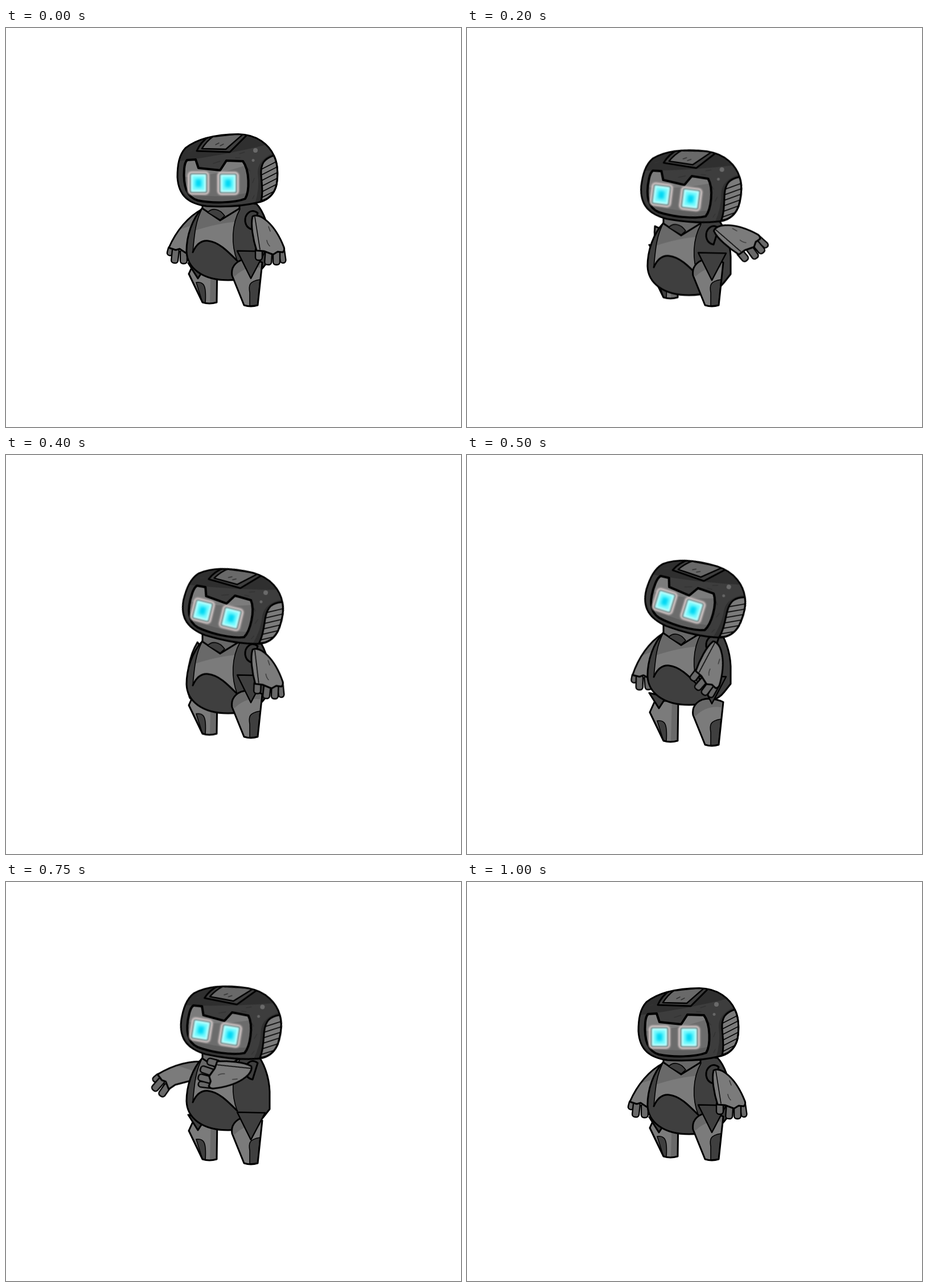
An HTML page that plays this animation: 799 by 701 pixels, repeating every 1.05 s.

```html
<!DOCTYPE html>
<html lang="en">
<head>
<meta charset="utf-8">
<title>Walking robot</title>
<style>
html, body { margin: 0; width: 100%; height: 100%; overflow: hidden; background: #fff; }
svg { display: block; width: 799px; height: 701px; }
g { stroke-linejoin: round; stroke-linecap: round; }
.ink { stroke: #000; stroke-width: 3; }
.mid { stroke: #000; stroke-width: 2.4; }
.thin { stroke: #000; stroke-width: 1.6; }
.light { fill: #7b7b7b; }
.dark { fill: #3f3f3f; }
.shade { fill: #696969; }
.none { fill: none; }
.scratch { fill: none; stroke: #333; stroke-width: 1.4; }

/* Four keyed quarters of five 50 ms steps, then one held step */
.move {
  transform-box: view-box;
  animation: 1050ms steps(5, end) -2ms infinite;
}
.bob { animation-name: bob; }
.head { animation-name: head; transform-origin: 364px 272.7px; }
.arm-l { animation-name: arm-l; transform-origin: 341px 334px; }
.arm-r { animation-name: arm-r; transform-origin: 432px 330px; }
.leg-l { animation-name: leg-l; }
.leg-r { animation-name: leg-r; }
.flap-l { animation-name: flap-l; }
.flap-r { animation-name: flap-r; }

@keyframes bob {
  0%, 95.2381%, 100% { transform: translateY(0); }
  23.8095% { transform: translateY(33px); }
  47.619% { transform: translateY(-4px); }
  71.4286% { transform: translateY(-7px); }
}
@keyframes head {
  0%, 95.2381%, 100% { transform: translate(0, 0) rotate(0deg); }
  23.8095% { transform: translate(3.75px, 30px) rotate(9deg); }
  47.619% { transform: translate(8px, -7.7px) rotate(17.2deg); }
  71.4286% { transform: translate(4px, -8.2px) rotate(9.3deg); }
}
@keyframes arm-l {
  0%, 95.2381%, 100% { transform: rotate(0deg); }
  23.8095% { transform: rotate(-70deg); }
  47.619% { transform: rotate(-5deg); }
  71.4286% { transform: rotate(35deg); }
}
@keyframes arm-r {
  0%, 95.2381%, 100% { transform: rotate(0deg); }
  23.8095% { transform: rotate(-50deg); }
  47.619% { transform: rotate(37deg); }
  71.4286% { transform: rotate(105deg); }
}
@keyframes leg-l {
  0%, 95.2381%, 100% { transform: translateY(0); }
  23.8095% { transform: translateY(-11px); }
  47.619% { transform: translateY(20px); }
  71.4286% { transform: translateY(5px); }
}
@keyframes leg-r {
  0%, 95.2381%, 100% { transform: translateY(0); }
  23.8095% { transform: translateY(0); animation-timing-function: steps(3, end); }
  38.0952% { transform: translateY(8px); animation-timing-function: steps(2, end); }
  47.619% { transform: translateY(22px); }
  71.4286% { transform: translateY(7px); }
}
@keyframes flap-l {
  0%, 95.2381%, 100% { transform: translateY(0); }
  23.8095% { transform: translateY(-40px); }
  47.619% { transform: translateY(5px); }
  71.4286% { transform: translateY(-4px); }
}
@keyframes flap-r {
  0%, 95.2381%, 100% { transform: translateY(0); }
  23.8095% { transform: translateY(4px); animation-timing-function: steps(3, end); }
  38.0952% { transform: translateY(-5px); animation-timing-function: steps(2, end); }
  47.619% { transform: translateY(-3px); }
  71.4286% { transform: translateY(13px); }
}
</style>
</head>
<body>
<svg viewBox="0 0 799 701">
  <defs>
    <filter id="soft" x="-50%" y="-50%" width="200%" height="200%"><feGaussianBlur stdDeviation="1.8"/></filter>
    <filter id="edge" x="-50%" y="-50%" width="200%" height="200%"><feGaussianBlur stdDeviation="1"/></filter>
    <filter id="core" x="-100%" y="-100%" width="300%" height="300%"><feGaussianBlur stdDeviation="2.4"/></filter>
    <path id="skull" d="M301 262C301 240 304 223 315 211C336 194 370 187 408 186.500C441 187 462 205 471 225C478 241 478 262 475 276C470 295 458 304 440 307C420 312 390 315 352 313C322 309 303 296 301 262Z"/>
    <path id="mask" d="M313 247Q314 236 318 232L333 231L338 246L376 250L387 233L416 234C428 250 428 287 420 300C400 308 360 308 337 303C315 297 311 272 313 247Z"/>
    <path id="vent" d="M470 224C453 230 447 238 448 258C450 280 451 292 448 304C467 299 475 284 476 268C478 245 475 232 470 224Z"/>
    <path id="chest" d="M345 316C333 338 331 360 328 394C335 378 345 373 355 374C374 376 390 393 406 409C395 380 396 345 411 318Z"/>
    <path id="sleeve" d="M345 318C320 331 299 356 286 386L298 390L305 388L317 396L322 383L350 350Z"/>
    <clipPath id="in-skull"><use href="#skull"/></clipPath>
    <clipPath id="in-mask"><use href="#mask"/></clipPath>
    <clipPath id="in-vent"><use href="#vent"/></clipPath>
    <clipPath id="in-chest"><use href="#chest"/></clipPath>
    <clipPath id="in-sleeve"><use href="#sleeve"/></clipPath>
    <g id="eye">
      <rect x="-17" y="-18.500" width="34" height="37" rx="5" class="none" stroke="#d8cccc" stroke-width="4" filter="url(#soft)"/>
      <rect x="-15" y="-17" width="30" height="34" rx="3" fill="#6f8383" filter="url(#edge)"/>
      <rect x="-13.500" y="-15.500" width="27" height="31" rx="2" fill="#b4fdfd" filter="url(#edge)"/>
      <rect x="-10" y="-12" width="20" height="24" rx="2" fill="#7dfbfd" filter="url(#edge)"/>
      <rect x="-5.500" y="-7" width="11" height="14" fill="#00d8f4" filter="url(#core)"/>
    </g>
  </defs>

  <g class="move bob"><g class="move arm-l">
    <g class="shade mid">
      <rect x="284" y="383" width="10" height="17" rx="5" transform="rotate(15 289 391)"/>
      <rect x="291" y="386" width="12" height="27" rx="5" transform="rotate(6 297 400)"/>
      <rect x="306" y="389" width="12" height="25" rx="5"/>
    </g>
    <use href="#sleeve" class="light"/>
    <path class="shade" clip-path="url(#in-sleeve)" d="M345 310L300 355L350 340Z"/>
    <use href="#sleeve" class="none ink"/>
  </g></g>

  <g class="move leg-l">
    <path class="light" d="M321 432L330 412L371 412L370 482Q357 486 345 482Z"/>
    <path class="shade" d="M360 412H371L370 483H358Z"/>
    <path class="dark thin" d="M334 447C348 445 352 453 350 483L345 482Z"/>
    <path class="none ink" d="M321 432L330 412L371 412L370 482Q357 486 345 482Z"/>
  </g>
  <g class="move flap-l">
    <path class="dark ink" d="M320 413L350 420L337 440Z"/>
  </g>

  <g class="move bob">
    <path class="dark ink" d="M345 316C327 335 317 365 317 392C318 422 345 443 390 443C415 443 440 436 452 420L463 406V375C462 348 452 322 440 309L410 306H352Z"/>
    <use href="#chest" class="light"/>
    <path class="shade" clip-path="url(#in-chest)" d="M320 310H412V340Q370 342 320 360Z"/>
    <use href="#chest" class="none thin"/>
    <path class="none ink" d="M328 394C335 378 345 373 355 374C374 376 390 393 406 409"/>
    <path class="shade ink" d="M345 298V317L376 338L410 317V298Z"/>
    <path class="dark thin" d="M354 324C361 316 374 316 384 330L376 337Z"/>
    <path class="dark ink" d="M442 325C430 316 419 327 420 340Q422 352 433 354Z"/>
  </g>

  <g class="move leg-r">
    <path class="light" d="M397 435C394 417 408 406 425 406Q440 407 450 412L442 487Q430 491 418 487Z"/>
    <path class="shade" d="M398 432C396 418 408 408 425 407Q440 408 448 413L446 421Q420 418 401 437Z"/>
    <path class="dark thin" d="M446 442C426 445 426 453 428 465V488L442 487Z"/>
    <path class="none ink" d="M397 435C394 417 408 406 425 406Q440 407 450 412L442 487Q430 491 418 487Z"/>
  </g>
  <g class="move flap-r">
    <path class="dark mid" d="M406 391.500L455 392.500L430 440Z"/>
  </g>

  <g class="move head">
    <use href="#skull" fill="#3d3d3d"/>
    <g clip-path="url(#in-skull)">
      <path fill="#2f2f2f" d="M295 235Q380 225 470 202L440 180L295 180Z"/>
      <path fill="#333" d="M300 265Q310 300 340 307Q390 314 438 306L445 320H300Z"/>
      <path fill="#303030" d="M437 310Q446 280 442 255Q441 233 470 219V312Z"/>
      <path class="dark ink" d="M335 216Q342 200 357 190L428 183L393 218Z"/>
      <path class="shade mid" d="M344 212Q352 199 363 191L418 185L386 213Z"/>
    </g>
    <path class="scratch" d="M368 205l6 -3M376 207l6 -3M410 221l9 -3M364 238l12 -4M403 228l8 0M433 272l3 -8M424 246l4 5M433 300l3 -6M320 218l7 -3"/>
    <circle cx="438" cy="215" r="4" fill="#6a6a6a"/>
    <circle cx="434" cy="232.500" r="2.500" fill="#666"/>

    <use href="#vent" class="light"/>
    <path class="none thin" clip-path="url(#in-vent)" d="M447 249l33 -17m-33 27l33 -17m-33 27l33 -17m-33 27l33 -17m-33 27l33 -17m-33 27l33 -17"/>
    <use href="#vent" class="none ink"/>

    <use href="#mask" fill="#6c6c6c"/>
    <path fill="#7c7c7c" clip-path="url(#in-mask)" d="M310 262Q370 260 430 238V225H310Z"/>
    <path fill="#5e5e5e" clip-path="url(#in-mask)" d="M310 285Q350 304 428 289V312H310Z"/>
    <use href="#mask" class="none" stroke="#000" stroke-width="4"/>
    <use href="#eye" x="338" y="272.500"/>
    <use href="#eye" x="390" y="273"/>
    <use href="#skull" class="none ink"/>
  </g>

  <g class="move bob"><g class="move arm-r">
    <g class="shade mid">
      <rect x="480" y="386" width="10" height="27" rx="5" transform="rotate(-8 485 398)"/>
      <rect x="438" y="386" width="12" height="22" rx="5"/>
      <rect x="455" y="390" width="12" height="26" rx="5" transform="rotate(4 461 400)"/>
      <rect x="469" y="390" width="12" height="26" rx="5"/>
    </g>
    <path class="light ink" d="M433 331C446 324 472 344 488 385Q490 391 486 394L477 393L469 398L453 392L440 391C434 372 429 345 433 331Z"/>
    <path class="none thin" d="M437 332L446 389"/>
    <path class="scratch" d="M461 349L464 357M458 373Q459 379 463 383"/>
  </g></g>
</svg>
</body>
</html>
```
